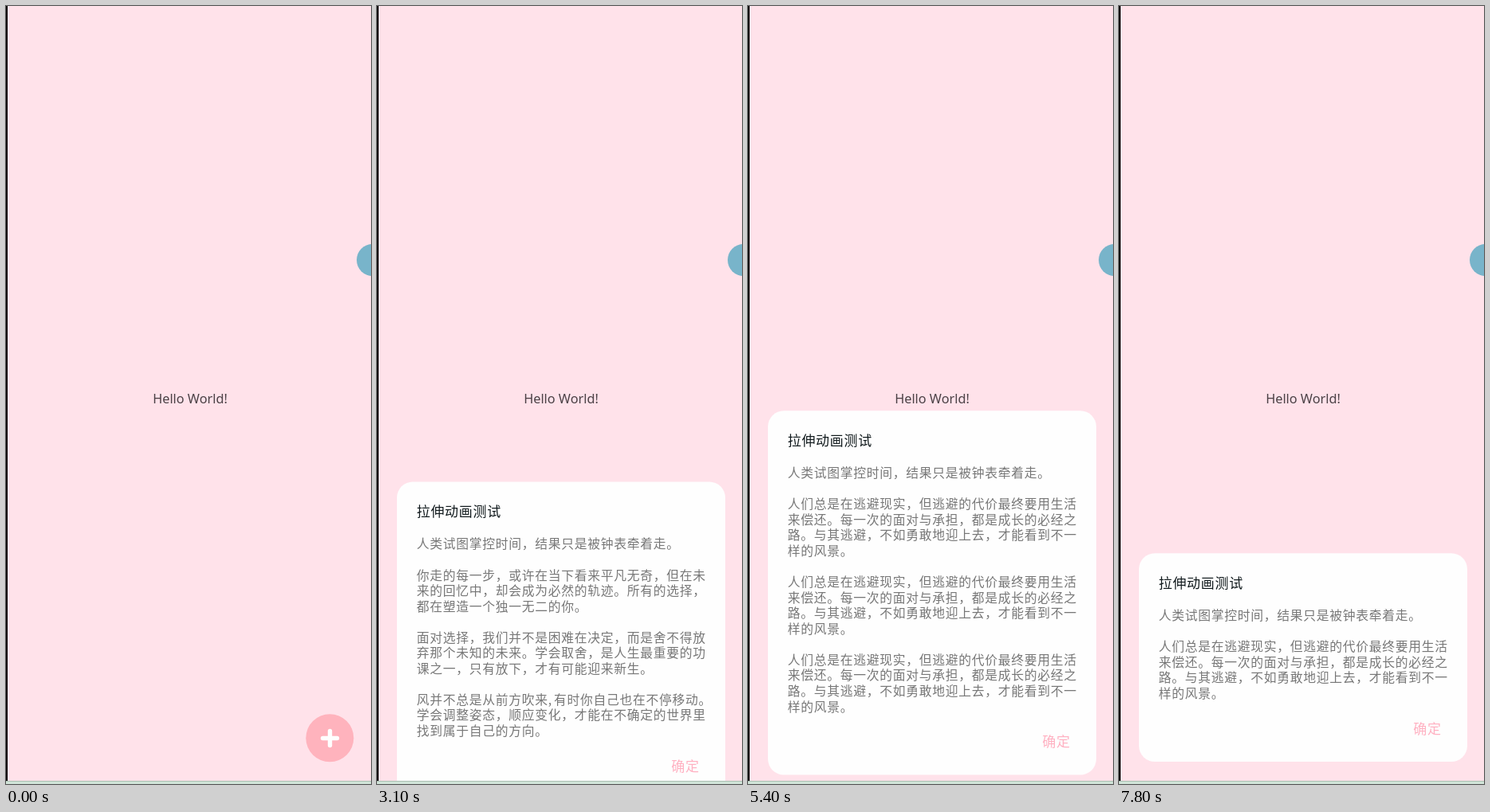
An HTML page for the animation above (8000 ms loop, 458 by 977 pixels).

```html
<!DOCTYPE html>
<html lang="zh-CN">
<head>
<meta charset="utf-8">
<title>拉伸动画测试</title>
<style>
  html, body { margin: 0; width: 100%; height: 100%; overflow: hidden; background: #ffe2ea; }
  svg { display: block; width: 458px; height: 977px; }
  text { font: 15.8px "Noto Sans CJK SC", "Noto Sans CJK", "Noto Sans", sans-serif; letter-spacing: 0.7px; white-space: pre; }
  .title { font-size: 17px; font-weight: 500; fill: #10191c; }
  .body { fill: #777; }
  .ok { font-size: 17px; fill: #ffb0c1; }
  .hello { font: 16.3px "Noto Sans", sans-serif; letter-spacing: 0; fill: #4b4146; text-anchor: middle; }
</style>
</head>
<body>
<svg viewBox="0 0 458 977">
  <rect width="458" height="977" fill="#ffe2ea"/>
  <text class="hello" x="231" y="498.5">Hello World!</text>
  <g id="fab">
    <circle cx="406.3" cy="919.3" r="30" fill="#ffb3bd"/>
    <path d="M397.5 919.5h18M406.5 910.5v18" stroke="#fff" stroke-width="5.4" stroke-linecap="round"/>
  </g>
  <g id="card">
    <rect id="panel" x="25" width="412" rx="20" fill="#fefefe"/>
    <g id="content">
      <text class="title" x="49.7" y="43.6">拉伸动画测试</text>
      <g id="lines"></g>
      <text class="ok" id="ok" x="369.3">确定</text>
    </g>
  </g>
  <circle cx="460" cy="319" r="20" fill="#78b4ca"/>
  <rect width="2" height="977" fill="#000"/>
  <rect y="973" width="458" height="4" fill="#d0e4d8"/>
  <rect y="973" width="458" height="1" fill="#abbfb3"/>
</svg>
<script>
const LOOP = 8000, STEP = 100, BOTTOM = 949, LEADING = 19.55;
const DURATION = 300, TOP_LAG = 17.6;
const PIVOT = [410, 934], MIN_SCALE = 0.263;

const intro = '人类试图掌控时间，结果只是被钟表牵着走。';
const walk = '你走的每一步，或许在当下看来平凡无奇，但在未\n来的回忆中，却会成为必然的轨迹。所有的选择，\n都在塑造一个独一无二的你。';
const choice = '面对选择，我们并不是困难在决定，而是舍不得放\n弃那个未知的未来。学会取舍，是人生最重要的功\n课之一，只有放下，才有可能迎来新生。';
const wind = '风并不总是从前方吹来,有时你自己也在不停移动。\n学会调整姿态，顺应变化，才能在不确定的世界里\n找到属于自己的方向。';
const effort = '你认为的偶然,往往是别人十年如一日努力的必然。\n成功没有捷径，只有坚持与积累，才能让不可能成\n为可能。';
const escape = '人们总是在逃避现实，但逃避的代价最终要用生活\n来偿还。每一次的面对与承担，都是成长的必经之\n路。与其逃避，不如勇敢地迎上去，才能看到不一\n样的风景。';

// Each state: start time and the paragraphs after the intro.
const states = [
  [0],
  [2080, walk],
  [3001, walk, choice, wind],
  [3922, walk, choice, wind, choice, choice, effort],
  [4873],
  [5215, escape, escape, escape],
  [5773],
  [7480, escape]
].map(([start, ...paragraphs]) => {
  const lines = [intro, ...paragraphs].join('\n\n').split('\n');
  return { start, lines, height: 164 + LEADING * (lines.length - 1) };
});

const el = id => document.getElementById(id);
const [fab, card, panel, content, linesBox, ok] =
  ['fab', 'card', 'panel', 'content', 'lines', 'ok'].map(el);
const clamp = x => Math.min(1, Math.max(0, x));
const progress = (t, start, duration = DURATION) => clamp((t - start) / duration);
const easeOut = (x, power = 3) => 1 - (1 - x) ** power;
const mix = (a, b, k) => a + (b - a) * k;

// A narrow comma is followed by a little extra space.
const spaceComma = line => line.replace(/,(.*)/, ',<tspan dx="2.2">$1</tspan>');

let shown;
function setText(state) {
  if (state === shown) return;
  shown = state;
  linesBox.innerHTML = state.lines.map((line, i) =>
    `<text class="body" x="49.8" y="${84 + i * LEADING}">${spaceComma(line)}</text>`).join('');
  ok.setAttribute('y', state.height - 35.5);
}

function stretch(t) {
  const i = states.findLastIndex(s => t >= s.start);
  const to = states[i], from = states[Math.max(0, i - 1)];
  const ease = lag => easeOut(progress(t, to.start + lag));
  const shrinking = to.height < from.height;
  const height = shrinking ? mix(from.height, to.height, ease(0)) : to.height;
  const top = BOTTOM - mix(from.height, to.height, ease(shrinking ? TOP_LAG : 0));
  setText(to);
  panel.setAttribute('y', top);
  panel.setAttribute('height', height);
  content.setAttribute('transform', `translate(0 ${top})`);
}

// Opening and closing scale the card out of and back into the button.
function reveal(t) {
  const closing = t >= 6290 && t < 6690;
  const open = progress(t, t < 6690 ? 1170 : 6670);
  const close = progress(t, 6290, 400);
  const size = closing ? 1 - easeOut(close, 2) : easeOut(open);
  const alpha = closing ? 1 - close : clamp(open * 2);
  const scale = mix(MIN_SCALE, 1, size);
  const [x, y] = PIVOT;
  card.setAttribute('transform', `translate(${x} ${y}) scale(${scale}) translate(${-x} ${-y})`);
  card.setAttribute('opacity', alpha);
  fab.setAttribute('opacity', closing ? clamp(close * 1.3) : 1 - alpha);
}

function draw(now) {
  const t = Math.floor((now % LOOP) / STEP) * STEP;
  stretch(t);
  reveal(t);
  requestAnimationFrame(draw);
}
draw(performance.now());
</script>
</body>
</html>
```
